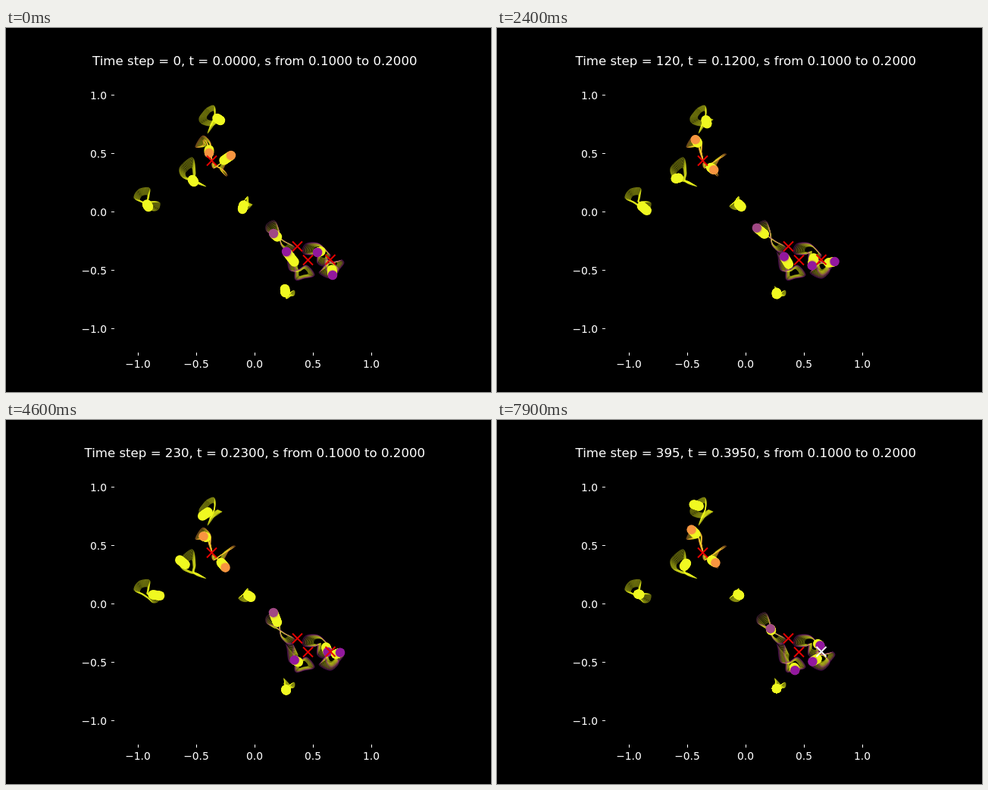
Recreate the animation shown at these times as an HTML page with a canvas. Size 640 by 480 pixels, loop 8000 ms.

```html
<!DOCTYPE html>
<html lang="en">
<head>
<meta charset="utf-8">
<title>Orbit families</title>
<style>
  html, body { margin: 0; width: 100%; height: 100%; overflow: hidden; background: #000; }
  canvas, svg { position: absolute; left: 0; top: 0; width: 640px; height: 480px; }
  text { fill: #fff; font-family: "DejaVu Sans", sans-serif; font-size: 13.85px; text-anchor: middle; }
  #title { font-size: 16.61px; }
  .y { text-anchor: end; }
  #ticks { stroke: #fff; stroke-width: 1; }
</style>
</head>
<body>
<canvas id="plot" width="640" height="480"></canvas>
<svg id="axes" viewBox="0 0 640 480">
  <text id="title" x="328.3" y="49"></text>
  <path id="ticks"/>
</svg>
<script>
const LOOP = 8000, FRAME = 100, KEY_GAP = 1600;
const FAMILY = 11, RADIUS = 6.2;
const YELLOW = [240, 249, 33], ORANGE = [248, 149, 64], MAUVE = [160, 72, 132], PURPLE = [146, 24, 158];

// A family is one closed orbit scaled about its centre, from half to full size.
// The orbit passes its key points, x and y offsets from the centre, every KEY_GAP ms.
const body = (color, centre, ...keys) => ({ color, centre, keys });
const bodies = [
  body(YELLOW, [274, 116], 9,6, 8,7, -3,13, -16,10, -19,3, -14,-5, -8,-11, 1,-13, 1,3, -8,23, 3,9, 11,5),
  body(ORANGE, [268, 156], 0,9, -4,-7, -8,-8, -8,-2, -18,1, -11,-12, -5,-13, 2,-4, 2,10, 5,22),
  body(ORANGE, [278, 181], 19,-13, 10,2, 8,9, 12,14, 14,13, 10,7, 0,2, -6,-3, -4,4, 8,-4, 24,-14),
  body(YELLOW, [244, 197], 4,6, -3,4, -13,-2, -14,-14, 2,-26, 6,-7, 5,6, 20,12, 11,8),
  body(YELLOW, [184, 229], 4,7, 10,12, 17,10, 19,2, 14,0, 4,1, 5,-8, 5,-18, -9,-16, -15,-5, -5,1),
  body(YELLOW, [315, 228], -3,11, 4,11, 10,5, 8,6, 6,7, 5,3, 4,-6, -2,2, -8,7),
  body(MAUVE, [363, 280], -10,-9, -19,-12, -19,-21, -9,-26, -4,-17, -2,-4, 1,8, 11,16, 18,9, 6,2),
  body(PURPLE, [391, 322], -21,-27, -12,-26, -13,-14, -10,-4, -9,10, 3,8, 16,4, 6,-9, -6,-3, -17,-3, -20,-20),
  body(PURPLE, [420, 293], -9,3, -9,17, 1,21, 5,12, 8,8, 6,4, -8,-9, -25,-8, -28,4, -14,6),
  body(PURPLE, [429, 311], 2,15, 16,1, 15,-5, 11,-4, -5,0, -13,8, -15,13, 0,19, 10,7, -7,-6, -6,9),
  body(YELLOW, [369, 354], -1,-10, -2,-6, 2,-4, 1,3, 7,-1, 0,0, 11,-8, 10,-1, -2,-13)
];
const crosses = [[271.5, 175], [384.5, 288], [398.5, 306], [428, 305.5]];
const WHITE_FROM = 300;

const canvas = document.getElementById("plot");
const ctx = canvas.getContext("2d");
const title = document.getElementById("title");

// Offset from the centre on a closed Catmull-Rom spline; pos counts key points.
function offset({ keys }, pos) {
  const count = keys.length / 2, i = Math.floor(pos), u = pos - i;
  return [0, 1].map(axis => {
    const [a, b, c, d] = [-1, 0, 1, 2].map(n => keys[(i + n + count) % count * 2 + axis]);
    return b + u / 2 * (c - a + u * (2 * a - 5 * b + 4 * c - d + u * (3 * (b - c) + d - a)));
  });
}

// Calls paint(at, share) for each member, from the smallest orbit to the largest.
function eachMember({ centre }, paint) {
  for (let n = 0; n < FAMILY; n++) {
    const share = n / (FAMILY - 1), size = (1 + share) / 2;
    paint(([x, y]) => [centre[0] + size * x, centre[1] + size * y], share);
  }
}

function shade(color, mix) {
  return `rgb(${YELLOW.map((c, i) => Math.round(c + (color[i] - c) * mix))})`;
}

function drawOrbits() {
  const layer = document.createElement("canvas");
  layer.width = 640;
  layer.height = 480;
  const pen = layer.getContext("2d");
  pen.lineWidth = 0.8;
  pen.globalAlpha = 0.6;
  for (const b of bodies) {
    const samples = [];
    for (let pos = 0; pos < b.keys.length / 2; pos += 0.05) samples.push(offset(b, pos));
    eachMember(b, (at, share) => {
      pen.beginPath();
      for (const s of samples) pen.lineTo(...at(s));
      pen.closePath();
      pen.strokeStyle = shade(b.color, share ** 3);
      pen.stroke();
    });
  }
  return layer;
}

function drawCross([x, y], color) {
  const r = 6.5;
  ctx.strokeStyle = color;
  ctx.lineWidth = 2;
  ctx.beginPath();
  for (const side of [-r, r]) {
    ctx.moveTo(x - side, y - r);
    ctx.lineTo(x + side, y + r);
  }
  ctx.stroke();
}

function buildAxes() {
  const axes = document.getElementById("axes");
  let ticks = "";
  const label = (value, x, y, cls) => {
    const text = document.createElementNS("http://www.w3.org/2000/svg", "text");
    text.setAttribute("x", x);
    text.setAttribute("y", y);
    text.setAttribute("class", cls);
    text.textContent = value.toFixed(1).replace("-", "\u2212");
    axes.append(text);
  };
  for (let v = -1; v <= 1; v += 0.5) {
    const x = 328 + 154 * v, y = 242.5 - 154 * v;
    ticks += `M${x + 0.5} 428v4M139 ${y}h4`;
    label(v, x, 448, "x");
    label(v, 133, y + 5, "y");
  }
  document.getElementById("ticks").setAttribute("d", ticks);
}

const orbits = drawOrbits();
let shown = -1;

function draw(now) {
  requestAnimationFrame(draw);
  const index = Math.floor(now % LOOP / FRAME);
  if (index === shown) return;
  shown = index;
  const step = index * 5, pos = index * FRAME / KEY_GAP;
  title.textContent = `Time step = ${step}, t = ${(step / 1000).toFixed(4)}, s from 0.1000 to 0.2000`;

  ctx.clearRect(0, 0, 640, 480);
  ctx.drawImage(orbits, 0, 0);
  for (const b of bodies) {
    const spot = offset(b, pos);
    eachMember(b, (at, share) => {
      ctx.fillStyle = shade(b.color, share ** 12);
      ctx.beginPath();
      ctx.arc(...at(spot), RADIUS, 0, 2 * Math.PI);
      ctx.fill();
    });
  }
  crosses.forEach((cross, i) =>
    drawCross(cross, i === 3 && step >= WHITE_FROM ? "#fff" : "#e60000"));
}

buildAxes();
draw(performance.now());
</script>
</body>
</html>
```
